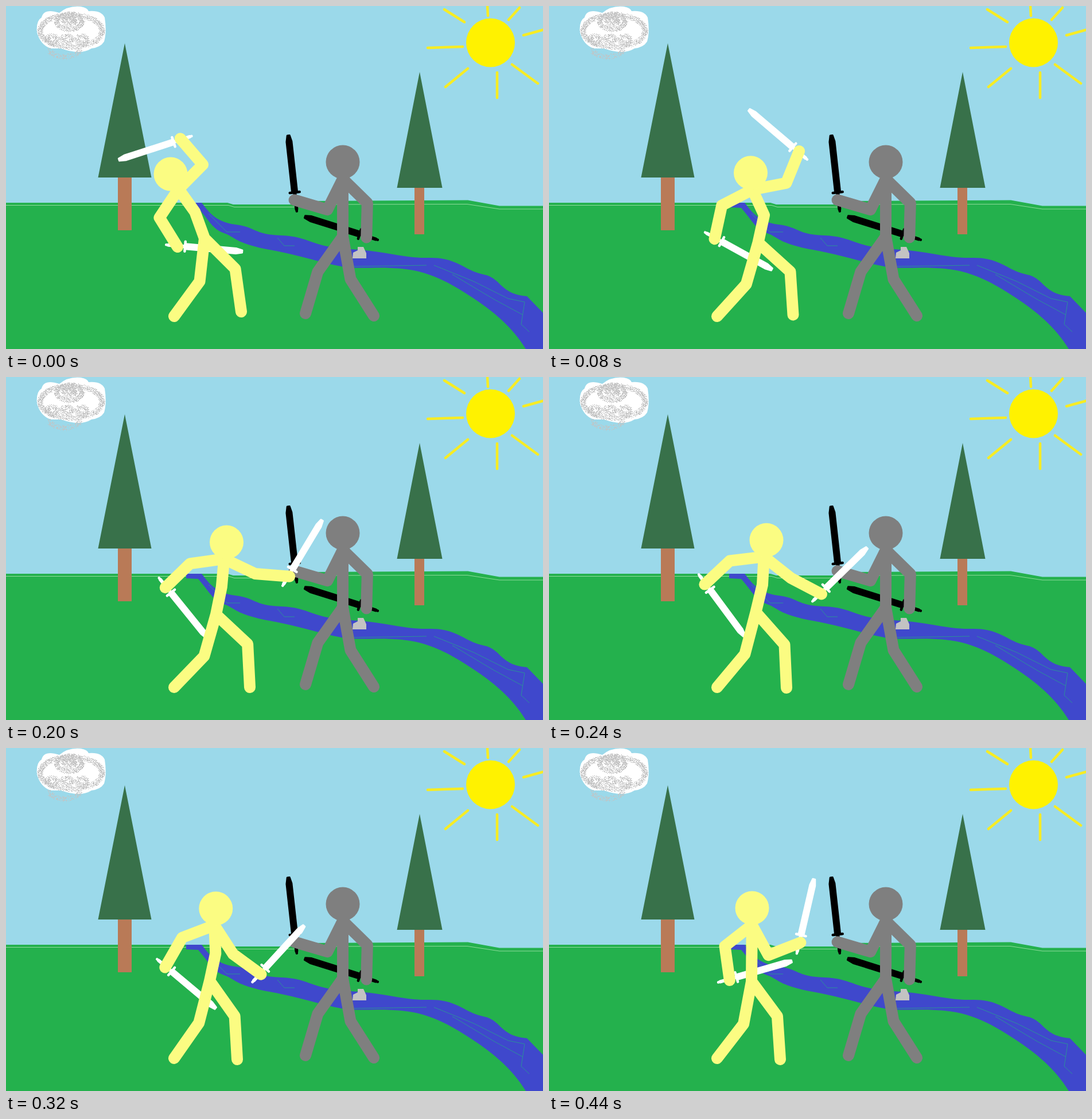
Animation of 936 by 598 pixels, one loop 480 ms. Source, as an HTML page:

```html
<!DOCTYPE html>
<html lang="en">
<head>
<meta charset="utf-8">
<title>Sword fight</title>
<style>
  html, body { margin: 0; width: 100%; height: 100%; overflow: hidden; background: #9bd9ea; }
  svg { display: block; width: 936px; height: 598px; }
  .rays { stroke: #f7ec24; stroke-width: 4.5; stroke-linecap: round; }
  .leaves { fill: #38714a; }
  .trunk { fill: #b97a57; }
  .ripples { fill: none; stroke: #2b8f9a; }
  .body { fill: none; stroke: currentColor; stroke-width: 20; stroke-linecap: round; stroke-linejoin: round; }
  .head { fill: currentColor; }
</style>
</head>
<body>
<svg viewBox="0 0 936 598">
  <defs>
    <!-- Grip at the origin, blade along +x -->
    <g id="sword" stroke="currentColor" stroke-linecap="round" stroke-linejoin="round" transform="translate(0 -2)">
      <path d="M14-4.5H102L113-2V2L102 4.5H14Z" fill="currentColor" stroke-width="3"/>
      <path d="M13-8.5V8.5" stroke-width="4.5"/>
      <path d="M13 0H-16" stroke-width="6"/>
      <path d="M-16 0H-20" stroke-width="4.5"/>
    </g>
  </defs>

  <rect width="936" height="598" fill="#9bd9ea"/>

  <path fill="#fff" d="M62 20Q66 3 93 12Q108-1 130 1Q142 3 144 9Q166 7 172 20Q176 45 171 62Q165 72 149 74Q130 86 96 74H78Q60 68 54 46Q52 26 62 20Z"/>
  <path id="spray" stroke="#c3c3c3" shape-rendering="crispEdges"/>

  <path class="rays" d="M764 6L799 28M839-2L840 17M895 3L876 24M938 41L902 51M882 102L927 135M856 116V160M805 109L766 141M735 73L796 71"/>
  <circle cx="844.5" cy="64" r="42.5" fill="#fff200"/>

  <path fill="#24b14d" d="M0 343H386L396 346H510L524 340L805 338.500L860 348.500H936V598H0Z"/>
  <path fill="none" stroke="#8fdc9c" d="M0 347.500H388L398 350.500H500L540 346L804 345.500L860 354H936"/>

  <path fill="#3f48cc" d="M314 343H341C352 356 362 376 400 381S430 398 480 400S530 420 600 424S690 440 738 439S800 462 832 468S860 502 908 506L936 535V598H906C880 555 840 525 800 500S730 462 690 458S630 458 600 456S520 436 460 425S400 403 380 396S355 375 335 352L314 351Z"/>
  <path class="ripples" d="M353 362L385 394H408M473 404L485 418H503M605 454L733 452M746 452L815 480L875 510L904 516L898 555L912 568M778 468L850 511L900 538"/>
  <path fill="#c3c3c3" d="M604 440L605 430L613 426V420H623L628 431V440Z"/>

  <path class="trunk" d="M195 298h24v93h-24ZM712 316h17v82h-17Z"/>
  <path class="leaves" d="M207 65L253.500 299H160.500ZM721 115L760.500 317H681.500Z"/>
</svg>

<script>
const svg = document.querySelector('svg');

function add(parent, tag, attrs) {
  const el = document.createElementNS('http://www.w3.org/2000/svg', tag);
  for (const name in attrs) el.setAttribute(name, attrs[name]);
  return parent.appendChild(el);
}

// Grey airbrush loops on the cloud
let seed = 7, dots = '';
const rand = () => (seed = seed * 16807 % 2147483647) / 2147483647;
function spray(cx, cy, rx, ry, count, arc = 2 * Math.PI) {
  for (let i = 0; i < count; i++) {
    const a = arc * rand(), b = 2 * Math.PI * rand(), r = 5 * Math.sqrt(rand());
    const x = cx + rx * Math.cos(a) + r * Math.cos(b);
    const y = cy + ry * Math.sin(a) + r * Math.sin(b);
    dots += `M${Math.round(x)} ${Math.round(y) + .5}h1`;
  }
}
spray(113, 43, 54, 28, 1700);
spray(110, 27, 22, 13, 800);
spray(110, 25, 10, 5, 400);
for (const x of [80, 106, 132]) spray(x, 58, 9, 6, 280);
spray(102, 76, 26, 12, 260, Math.PI);
document.getElementById('spray').setAttribute('d', dots);

const RAD = 29.5, ARM = 60, LEG = 75.5, SPINE = 49;

// Point at a distance from p, in degrees
const polar = ([x, y], [deg, dist]) => {
  const a = deg * Math.PI / 180;
  return [x + dist * Math.cos(a), y + dist * Math.sin(a)];
};

// Middle joint of two equal bones that span a to b
function joint(a, b, bone, side) {
  const dx = b[0] - a[0], dy = b[1] - a[1], len = Math.hypot(dx, dy);
  const out = side * Math.sqrt(Math.max(0, bone * bone - len * len / 4)) / len;
  return [a[0] + dx / 2 - dy * out, a[1] + dy / 2 + dx * out];
}

class Fighter {
  constructor(color, steel, facing) {
    const g = add(svg, 'g', { color });
    this.facing = facing;
    this.swords = [0, 1].map(() => add(g, 'use', { href: '#sword', color: steel }));
    this.body = add(g, 'path', { class: 'body' });
    this.head = add(g, 'circle', { class: 'head', r: RAD });
  }

  draw({ head, hip, arms, blades, feet }) {
    const f = this.facing;
    const tilt = Math.atan2(hip[1] - head[1], hip[0] - head[0]) * 180 / Math.PI;
    const neck = polar(head, [tilt, RAD]);
    const hands = arms.map(arm => polar(neck, arm));
    const lines = [
      [head, neck, joint(neck, hip, SPINE, -f), hip],
      ...hands.map(hand => [neck, joint(neck, hand, ARM, f), hand]),
      ...feet.map(foot => [hip, joint(hip, foot, LEG, -f), foot])
    ];
    this.body.setAttribute('d', lines.map(l => 'M' + l.join('L')).join(''));
    this.head.setAttribute('cx', head[0]);
    this.head.setAttribute('cy', head[1]);
    this.swords.forEach((sword, i) =>
      sword.setAttribute('transform', `translate(${hands[i]}) rotate(${blades[i]}) scale(1 ${f})`));
  }
}

// Arms are [direction, reach] from the neck; a pose keeps what it does not change
const back = [293, 541];
const poses = [
  { head: [287, 293], hip: [346, 405], arms: [[-88, 88], [91, 101]], blades: [162, 5], feet: [back, [410, 533]] },
  { head: [318.5, 293.5], hip: [363, 411], arms: [[-67, 99], [108, 107]], blades: [177, 16], feet: [back, [426, 536]] },
  { head: [384.5, 288], hip: [366, 414], arms: [[-12, 112], [147, 110]], blades: [264, 42], feet: [back, [425, 541]] },
  { arms: [[15, 118], [154, 114]], blades: [301, 51] },
  { head: [373.5, 280.5], hip: [355, 406], arms: [[51, 121], [156, 114]], blades: [330, 56], feet: [back, [403, 543]] },
  { head: [358, 279], arms: [[42, 115], [123, 112]], blades: [295, 24] },
  { head: [354, 279], hip: [353, 407], arms: [[20, 90], [112, 104]], blades: [283, -16] }
];
poses.forEach((pose, i) => poses[i] = { ...poses[i - 1], ...pose });

const mix = (a, b, k) => a.map ? a.map((v, i) => mix(v, b[i], k)) : a + (b - a) * k;

function poseAt(pos) {
  const i = Math.floor(pos), from = poses[i], to = poses[i + 1] || from, pose = {};
  for (const part in from) pose[part] = mix(from[part], to[part], pos - i);
  return pose;
}

new Fighter('#7f7f7f', '#000', -1).draw({
  head: [587, 272], hip: [587, 402], arms: [[156.5, 92], [68, 110]],
  blades: [263.7, 197.5], feet: [[522, 536], [641, 540]]
});
const attacker = new Fighter('#fbfc82', '#fff', 1);

// The first pose cuts to the second; later poses have one in-between each
const STEP = 40, STEPS = 12;
function frame() {
  const n = Math.floor(performance.now() / STEP) % STEPS;
  attacker.draw(poseAt(n ? (n + 1) / 2 : 0));
  requestAnimationFrame(frame);
}
frame();
</script>
</body>
</html>
```
